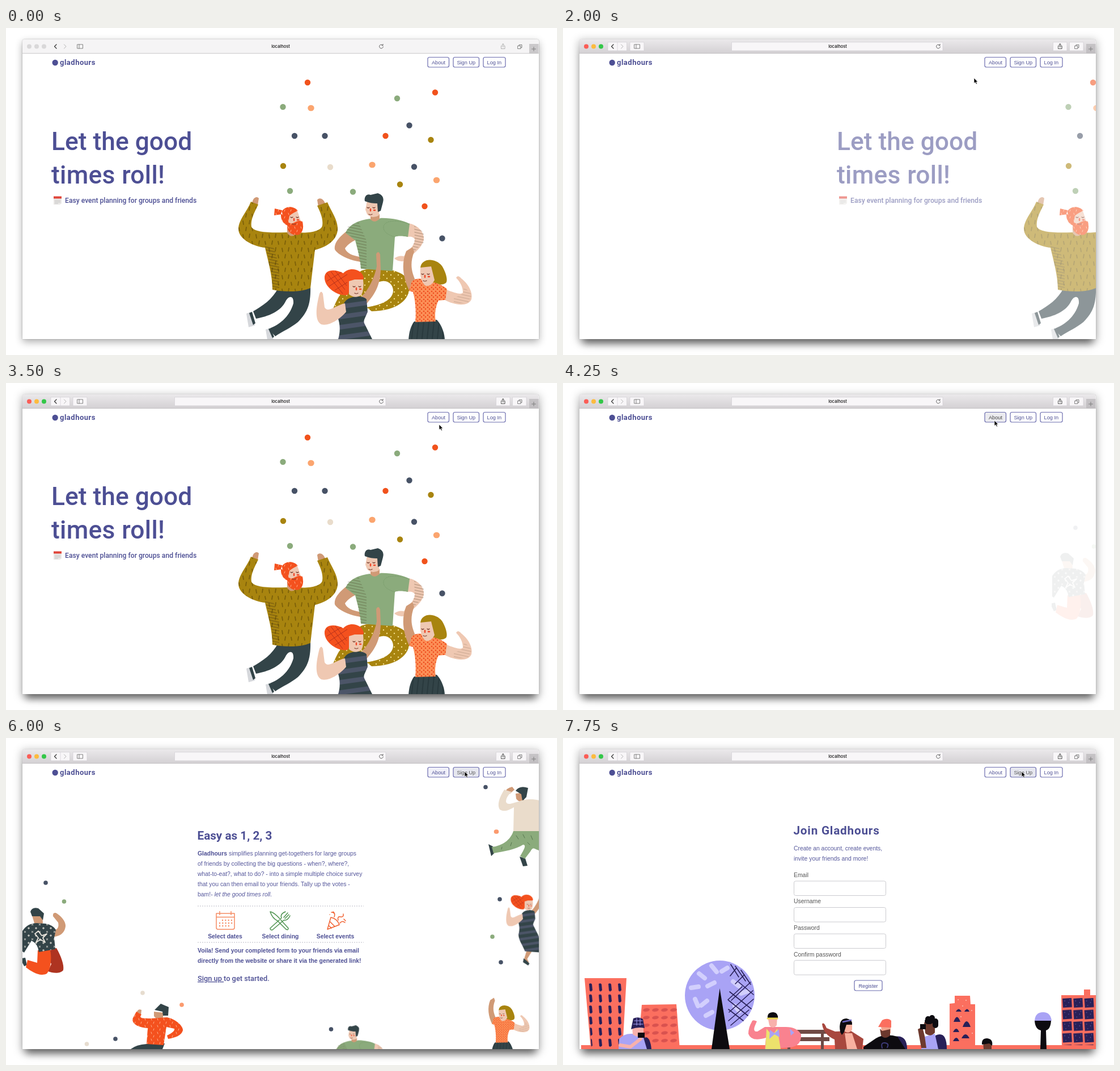
Animation of 972x576 px, one loop 8 s. Source, as an HTML page:

```html
<!DOCTYPE html>
<html lang="en">
<head>
<meta charset="utf-8">
<title>Event planner</title>
<style>
html, body { margin: 0; width: 100%; height: 100%; overflow: hidden; background: #fff; }
.win { position: absolute; left: 29px; top: 20px; width: 910.5px; height: 528px; border-radius: 4px 4px 0 0; }
.win.off { box-shadow: 0 5px 14px rgba(0,0,0,.32), 0 0 2px rgba(0,0,0,.35); }
.win.on { box-shadow: 0 14px 13px -6px rgba(0,0,0,.5), 0 3px 15px 2px rgba(0,0,0,.25), 0 0 1px rgba(0,0,0,.4); }
svg { position: absolute; left: 0; top: 0; width: 972px; height: 576px; }
text { font: 10.42px "Liberation Sans", Arial, sans-serif; fill: #55579b; }
.b { font-weight: 700; fill: #4d4f94; }
.r { font-family: Roboto, sans-serif; font-weight: 500; fill: #4d4f94; }
.big { font-size: 44.3px; }
.h { font-size: 20.7px; font-weight: 700; }
.m { text-anchor: middle; }
.lab { fill: #555; }
.nav { stroke: #6b6cae; stroke-width: 1.2; fill: #fff; color: #4d4f94; }
.nav text { font-size: 9.2px; stroke: none; fill: currentColor; text-anchor: middle; }
.line { fill: none; stroke-linecap: round; stroke-linejoin: round; }
.ol { fill: #a8840f; } .dk { fill: #334448; } .gr { fill: #8bab7c; } .or { fill: #f4511e; }
.tan { fill: #d09a76; } .pk { fill: #efc8b2; } .cr { fill: #eadccb; }
.co { fill: #fb6f5f; } .nv { fill: #282058; } .lv { fill: #a9a3f5; } .bk { fill: #0d0b10; }
.dots { fill: none; stroke-linecap: round; stroke-width: 10.4; }
.small { stroke-width: 7.6; }
.lamps { stroke-width: 8; }

/* One 8 s clock, held for 250 ms (3.125%) per pose. */
.on, .off, .load, .idle, .cursor, .home, .about, .join, #nav1, #nav2 { animation: 8s step-end infinite; }
.on { animation-name: on; } .off { animation-name: off; }
.load { animation-name: load; } .idle { animation-name: idle; }
.home { animation-name: home; } .about { animation-name: about; } .join { animation-name: join; }
.cursor { animation-name: cursor; } #nav1 { animation-name: nav1; } #nav2 { animation-name: nav2; }
@keyframes on { 0% { opacity: 0 } 18.75%, 100% { opacity: 1 } }
@keyframes off { 0% { opacity: 1 } 18.75%, 100% { opacity: 0 } }
@keyframes load { 0%, 21.875%, 100% { opacity: 0 } 18.75% { opacity: 1 } }
@keyframes idle { 0%, 21.875%, 100% { opacity: 1 } 18.75% { opacity: 0 } }
@keyframes home {
  0% { translate: 0; opacity: 1 }
  18.75% { translate: 0; opacity: 0 }
  21.875% { translate: 841px; opacity: .08 }
  25% { translate: 403px; opacity: .56 }
  28.125% { translate: 131px; opacity: .86 }
  31.25% { translate: 17px; opacity: .98 }
  34.375% { translate: 0; opacity: 1 }
  53.125%, 100% { translate: 0; opacity: 0 }
}
@keyframes about {
  0% { translate: 0; opacity: 0 }
  53.125% { translate: 834px; opacity: .08 }
  56.25% { translate: 395px; opacity: .57 }
  59.375% { translate: 126px; opacity: .86 }
  62.5% { translate: 15.5px; opacity: .98 }
  65.625% { translate: 0; opacity: 1 }
  87.5%, 100% { translate: 0; opacity: 0 }
}
@keyframes join {
  0% { translate: 0; opacity: 0 }
  87.5% { translate: 706px; opacity: .22 }
  90.625% { translate: 269px; opacity: .7 }
  93.75% { translate: 67px; opacity: .92 }
  96.875%, 100% { translate: 0; opacity: 1 }
}
@keyframes nav1 {
  0%, 87.5%, 100% { fill: #fff; color: #4d4f94 }
  46.875% { fill: #ebebef; color: #444 }
  65.625% { fill: #f0f0f9; color: #4d4f94 }
}
@keyframes nav2 { 0% { fill: #fff; color: #4d4f94 } 68.75%, 100% { fill: #e6e7ef; color: #555 } }
@keyframes cursor {
  0% { translate: 683px 50px; opacity: 0 }
  3.125% { translate: 683px 50px; opacity: 1 }
  6.25% { translate: 672px 43px }
  9.375% { translate: 664px 33px }
  12.5% { translate: 661px 30px }
  15.625% { translate: 660px 34px }
  18.75% { translate: 659px 36px }
  21.875% { translate: 668px 47px }
  25% { translate: 725px 88px }
  28.125% { translate: 790px 128px }
  31.25% { translate: 804px 136px }
  34.375% { translate: 802px 131px }
  37.5% { translate: 786px 106px }
  40.625% { translate: 770px 82px }
  43.75% { translate: 764px 73px }
  46.875% { translate: 761px 66px }
  65.625% { translate: 777px 66px }
  68.75% { translate: 797px 62px }
  71.875%, 100% { translate: 809px 59px; opacity: 1 }
}
</style>
</head>
<body>
<div class="win off"></div>
<div class="win on"></div>
<svg viewBox="0 0 972 576">
<defs>
  <clipPath id="page"><path d="M29 45H939.5V548H29Z"/></clipPath>
  <linearGradient id="bar" x2="0" y2="1"><stop stop-color="#ebe9eb"/><stop offset="1" stop-color="#d3d0d3"/></linearGradient>
  <pattern id="knit" width="23" height="24" patternUnits="userSpaceOnUse">
    <path class="ol" d="M0 0H23V24H0Z"/>
    <path class="line" stroke="#7c6008" stroke-width="1.8" d="M4 4l1 6M16 3l-1 6M10 15l-1 6M20 16l1 5"/>
  </pattern>
  <pattern id="spots" width="13" height="12" patternUnits="userSpaceOnUse">
    <path class="ol" d="M0 0H13V12H0Z"/>
    <path class="line" stroke="#f2dd8a" stroke-width="2.4" d="M3 3h0M9 9h0"/>
  </pattern>
  <pattern id="berry" width="7" height="7" patternUnits="userSpaceOnUse">
    <path fill="#fc8f57" d="M0 0H7V7H0Z"/>
    <path class="line" stroke="#ee4a1c" stroke-width="2.5" d="M2 2h0M5 5h0"/>
  </pattern>
  <pattern id="stripe" width="60" height="18" patternUnits="userSpaceOnUse" patternTransform="rotate(-8)">
    <path class="dk" d="M0 0H60V18H0Z"/><path fill="#4c5568" d="M0 6H60V14H0Z"/>
  </pattern>
  <pattern id="pleat" width="9" height="50" patternUnits="userSpaceOnUse" patternTransform="rotate(6)">
    <path class="dk" d="M0 0H9V50H0Z"/><path stroke="#1f2d31" d="M4 0V50"/>
  </pattern>
  <pattern id="flame" width="11" height="12" patternUnits="userSpaceOnUse">
    <path class="or" d="M0 0H11V12H0Z"/><path class="line" stroke="#ffb08a" d="M3 2l1 3M8 8l-1 3"/>
  </pattern>
  <pattern id="stars" x="36" y="332" width="13" height="13" patternUnits="userSpaceOnUse">
    <path class="dk" d="M0 0H13V13H0Z"/><path stroke="#e8e4dc" d="M2 3h4M4 1v4M9 8l3 3M12 8l-3 3"/>
  </pattern>
  <pattern id="hatch" width="20" height="5" patternUnits="userSpaceOnUse" patternTransform="rotate(12)"><path stroke="#3b2c10" stroke-opacity=".6" d="M0 2H20"/></pattern>
  <pattern id="tall" x="41" y="430" width="17" height="19.5" patternUnits="userSpaceOnUse">
    <path class="nv" d="M5 3Q9 1 10 4L11 14Q9 18 6 15Z"/>
  </pattern>
  <pattern id="wide" x="139" y="472" width="16" height="13.5" patternUnits="userSpaceOnUse">
    <ellipse cx="8" cy="7" rx="6" ry="3" fill="#d9524f" transform="rotate(-9 8 7)"/>
  </pattern>
  <pattern id="panes" x="880" y="457" width="19.3" height="20.5" patternUnits="userSpaceOnUse">
    <path class="nv" d="M1 2L17 1L18 17L2 18Z"/>
    <path class="line" stroke="#8d86e0" stroke-width="1.2" d="M5 6h0M12 9h0M7 14h0M14 4h0"/>
  </pattern>
  <g id="face" class="line">
    <path stroke="#7a4032" stroke-width="1.2" d="M0 0q2 2 4 0M10 0q2 2 4 0M3 12q3 2 6 0"/>
    <path stroke="#ee4a2c" stroke-width="2.5" d="M6 3v3M12 5h2"/>
  </g>

  <g id="tee">
    <path fill="url(#spots)" d="M626 428C650 418 700 424 710 445C718 470 700 498 645 499L636 492C660 488 683 480 683 462C682 446 664 440 650 452L600 498L575 500C585 470 605 445 626 428Z"/>
    <path class="tan" d="M601 358C590 366 578 378 580 390C585 400 610 411 628 412Q642 414 645 402Q634 398 626 403C612 402 600 396 598 388C604 380 612 375 620 372ZM643 328H659V345H643Z"/>
    <path class="pk" d="M711 344C725 347 738 358 737 372C735 388 715 400 705 410Q693 413 685 406Q692 400 702 402C712 392 722 380 721 372C718 367 713 367 706 368Z"/>
    <path class="gr" d="M599 361C605 345 625 338 642 336Q650 346 660 335C675 334 700 338 712 345L709 368C700 366 690 366 686 368L682 428L626 424C625 405 620 390 616 374Z"/>
    <path class="pk" d="M637 304H660L658 330Q646 337 637 328L634 320Z"/>
    <path class="dk" d="M633 305C631 296 638 291 643 294L656 291Q668 295 665 307L661 322L656 324L655 309Q643 309 636 306Z"/>
    <use href="#face" x="637" y="316"/>
    <path fill="url(#hatch)" d="M603 350L622 342L636 375V424H626L617 372L599 361ZM720 348L737 360V378L715 398L721 372Z" opacity=".7"/>
    <path class="line" stroke="#779a6a" stroke-dasharray="1 2" d="M711 345C690 338 668 338 666 350Q665 362 686 368"/>
  </g>

  <g id="stripes">
    <path class="tan" d="M653 398Q657 391 660 399L661 425C660 455 650 470 634 488L627 474C640 460 650 440 654 420ZM612 596L603 625L612 640L618 634L613 624L630 596Z"/>
    <path class="dk" d="M602 622l8 6 10 10-4 6-16-10Z"/>
    <path fill="url(#stripe)" d="M598 482C605 472 630 470 636 478L638 500C634 510 630 515 632 520L646 548C656 570 662 590 658 604L606 600C598 580 586 565 586 548C592 530 587 512 583 505Z"/>
    <path class="pk" d="M553 468Q556 461 559 468L562 492C568 503 582 488 598 485L600 500C590 512 570 526 556 522C545 516 546 495 553 468Z"/>
    <path class="or" d="M562 441C561 425 580 424 595 432C605 420 628 424 631 440L628 448L612 450L603 470C590 474 563 460 562 441Z"/>
    <path fill="none" stroke="#b8321b" d="M566 432l28 36M573 429l25 32M581 428l20 26M566 446l26-16M570 455l32-21M580 462l22-14"/>
    <path class="pk" d="M605 446L615 443H630Q632 460 627 470Q616 478 605 469Z"/>
    <use href="#face" x="612" y="455"/>
  </g>

  <g id="blouse">
    <path class="tan" d="M706 393C697 415 700 440 712 464L724 448C715 430 712 415 720 394L717 386Z"/>
    <path class="pk" d="M774 460C795 468 803 470 806 466C806 455 800 446 794 440Q797 434 803 441C815 450 824 465 821 478C815 492 790 488 774 479Z"/>
    <path fill="url(#hatch)" d="M808 456L822 470L815 484L790 486V476L806 468Z" opacity=".4"/>
    <path fill="url(#pleat)" d="M720 517L760 514C770 525 774 540 774 550H710C711 535 714 525 720 517Z"/>
    <path class="ol" d="M731 422C733 405 757 404 769 419C776 430 780 445 776 449C770 454 756 452 750 447Z"/>
    <path fill="url(#berry)" d="M716 446C725 440 735 440 738 447Q746 456 754 448C765 450 777 458 778 460L775 479L763 480C757 492 756 505 758 517L722 518C724 500 722 480 718 465L711 463Z"/>
    <path class="pk" d="M731 422L750 420L756 444Q750 456 740 454Q729 445 731 422Z"/>
    <use href="#face" x="733" y="433"/>
  </g>
</defs>

<path d="M29 45H939.5V548H29Z" fill="#fff"/>
<path id="top" d="M29 45V24Q29 20 33 20H935.500Q939.500 20 939.500 24V45Z" fill="#f5f4f5"/>
<path class="dots lamps" stroke="#d9d8d9" d="M41 32.500h0M54 32.500h0M67 32.500h0"/>
<g class="on">
  <path d="M29 45V24Q29 20 33 20H935.500Q939.500 20 939.500 24V45Z" fill="url(#bar)"/>
  <g class="dots lamps"><path stroke="#fb5d57" d="M41 32.500h0"/><path stroke="#fdbb3e" d="M54 32.500h0"/><path stroke="#33c748" d="M67 32.500h0"/></g>
  <path fill="#f8f6f8" stroke="#cfccd0" stroke-width=".6" stroke-linejoin="round" d="M79 25h33.500v15h-33.500ZM118 25h25v15h-25ZM297.500 25h372.500v15h-372.500ZM864.500 25h24.500v15h-24.500ZM893.500 25h24.500v15h-24.500ZM96 25v15"/>
</g>
<path d="M923 28H939.500V45H923Z" fill="#bab7ba" opacity=".7"/>
<path d="M29 44.700H939.500" stroke="#bdbabd" stroke-width=".8"/>
<g class="line" stroke="#777" stroke-width=".9">
  <path d="M89 29l-3.500 3.500 3.500 3.500" stroke="#333" stroke-width="1.2"/>
  <path d="M102.500 29l3.500 3.500-3.500 3.500" stroke="#aaa"/>
  <path d="M126 29h9.500v7h-9.500ZM129 29v7M927.500 37h7M931 33.500v7M903 31.500h5v5h-5ZM905 31.500v-2h5v5h-2"/>
  <path id="share" stroke="#aaa" d="M875 31.500h-1.500v5h6.500v-5h-1.500M876.800 34v-6M875 29.500l1.800-1.800 1.800 1.800"/>
  <g class="idle" stroke="#555">
    <path class="on" d="M875 31.500h-1.500v5h6.500v-5h-1.500M876.800 34v-6M875 29.500l1.800-1.800 1.800 1.800"/>
    <path d="M664.500 30.200A3.400 3.400 0 1 0 665.400 33M663 30.800h2v-2.300"/>
  </g>
</g>
<g class="load">
  <path class="line" stroke="#333" d="M659 29.500l6 6M665 29.500l-6 6"/><path fill="#2f94e8" d="M298 38.300H326.500V40H298Z"/>
</g>
<text x="484.500" y="35.400" class="m" style="font:500 7.5px Inter,sans-serif;fill:#111">localhost</text>

<g clip-path="url(#page)">
  <g class="home">
    <g class="dots">
      <path stroke="#f1521c" d="M532 96h0M757 113.500h0M669.500 190h0M738.500 314h0"/>
      <path stroke="#8bab7c" d="M488.500 139h0M690 124h0M501 287h0M612 288.500h0"/>
      <path stroke="#fba56f" d="M537.500 141h1M645.500 241h1M759 268h1"/>
      <path stroke="#475266" d="M509 190h0M562.500 190h0M711.500 171.500h0M720 244.500h0M769.500 370.500h0"/>
      <path stroke="#a8840f" d="M489 243h0M749.500 197h0M695 275.500h0"/>
      <path stroke="#e9dccb" d="M572 245h0"/>
    </g>
    <text class="r big" x="80" y="215">Let the good</text>
    <text class="r big" x="80" y="274" letter-spacing=".3">times roll!</text>
    <text class="r" x="104" y="308" style="font-size:12.18px">Easy event planning for groups and friends</text>
    <path d="M84 297h14v12l-3 2H84Z" fill="#e9e7e5"/><path d="M84 296.500h14v4H84Z" fill="#e0453a"/>
    <path d="M86 304h10M86 306.500h10M86 309h6" stroke="#bbb" stroke-width=".8"/>

    <path class="tan" d="M434 309C436 298 442 296 446 300L444 312ZM549 303C552 298 560 300 563 309L551 315Z"/>
    <path class="dk" d="M480 458L537 452C538 485 533 500 515 518C503 528 488 534 475 543L463 530C480 524 500 510 507 485C508 472 500 470 494 480C485 500 462 508 441 512L436 499C452 490 470 478 480 458Z"/>
    <path fill="#d6d8dc" d="M424 503L433 500L439 524L428 527ZM458 531L466 529L472 549L461 549Z"/>
    <path class="dk" d="M429 502L434 500L440 520L436 523ZM463 530L467 529L473 544L470 546Z"/>
    <path fill="url(#knit)" d="M432 306L445 311C438 325 431 338 433 350C437 360 465 361 494 360H514C535 362 556 358 558 348C560 335 553 322 549 313L567 307C573 322 586 338 585 356C583 375 565 386 545 391L537 458C520 466 490 465 470 461C470 435 462 410 457 387C437 385 410 372 410 354C410 338 426 322 432 306Z"/>
    <path fill="url(#hatch)" d="M457 382L472 386L482 420V460H470Q470 420 457 387Z"/>
    <path class="tan" d="M496 350H511V363Q503 371 496 361Z"/>
    <path class="pk" d="M497 326Q512 318 515 325L521 343Q505 347 496 342Z"/>
    <path fill="url(#flame)" d="M485 330C485 315 505 310 515 322Q505 326 500 331L497 348C489 345 485 338 485 330ZM487 321L474 318L473 330L487 328ZM495 338Q500 347 508 343Q518 337 523 341Q527 358 517 364Q503 367 497 355Z"/>
    <use href="#face" x="502" y="333"/>
    <use href="#tee"/><use href="#stripes"/><use href="#blouse"/>
  </g>

  <g class="about">
    <g class="dots small">
      <path stroke="#475266" d="M846 86.500h0M871 284h0M873 395h0M573.500 513h0M193 530h0M70 255h0"/>
      <path stroke="#8bab7c" d="M102.500 288h0M858 350h0"/><path stroke="#fb9a6e" d="M864.500 165h1M310 470h0"/>
      <path stroke="#e6dccf" d="M241 449h0M142.500 539h0"/>
    </g>
    <use href="#tee" transform="translate(223.6 331.6) scale(.6)"/>
    <use href="#stripes" transform="translate(570 33.6) scale(.57)"/>
    <use href="#blouse" transform="translate(430.6 226) scale(.6)"/>

    <path class="tan" d="M80 338C90 340 94 334 92 325L83 314Q82 307 88 308C98 314 106 324 105 332C103 345 94 349 85 350ZM46 313L64 312L65 326Q58 333 50 326Z"/>
    <path class="dk" d="M28 388l6-1 3 13-5 2-4-8ZM43 306Q46 297 57 300L67 309L65 321L60 314H46Z"/>
    <path fill="#ae3421" d="M66 374L89 370C97 384 103 400 101 409C95 416 82 414 74 411L80 398Z"/>
    <path class="or" d="M56 374H78C81 388 79 408 72 415C60 421 46 412 35 404L38 391L55 396Z"/>
    <path fill="url(#stars)" d="M29 340Q38 326 54 326L70 327Q84 330 88 338L85 352L87 372L58 377Q56 362 45 357L32 378L29 376Z"/>
    <path class="line" stroke="#e8e4dc" stroke-width="1.8" d="M57 340l6 8 9-3-7 7 4 8-8-5-8 5 4-8-6-7Z"/>

    <path class="tan" d="M880 97Q882 88 893 86L897 91L889 98ZM899 98L914 96V110Q906 115 900 107Z"/>
    <path class="dk" d="M899 93Q906 83 921 88L918 104L911 111L909 99ZM851 187l8 4 3 11-6 6ZM906 209l10 3 4 13-8 1Z"/>
    <path class="cr" d="M879 91C870 105 866 118 871 126C880 132 890 125 896 122L895 165H941V110C925 106 912 109 904 112C895 114 884 120 882 112C882 105 888 98 892 95Z"/>
    <path class="gr" d="M895 164H941V198C932 196 930 190 925 200L915 213L907 208C915 195 918 188 912 188C900 196 878 200 860 203L857 192C875 190 890 180 895 164Z"/>
    <path class="line" stroke="#577650" d="M900 172l4 6M912 170l3 6M892 184l-2 6M926 172l3 7M875 192l-1 4M920 184l4 4"/>

    <path class="dk" d="M220 548Q230 540 248 539L280 538L276 548Z"/>
    <path class="tan" d="M230 484Q233 476 239 479L238 488ZM261 482L279 484L276 495Q266 497 261 490Z"/>
    <path fill="url(#flame)" d="M230 482L239 487C234 494 240 494 255 494L284 492C300 495 313 508 312 515C310 524 298 528 286 530L284 524C292 520 298 516 297 512L283 509L278 541L248 539L250 511C235 510 223 505 223 495Z"/>
    <path class="dk" d="M262 479L273 468L287 474L286 489L277 489L276 482Z"/>

    <text class="r h" x="337.500" y="179">Easy as 1, 2, 3</text>
    <text x="338" y="206.700"><tspan class="b">Gladhours</tspan> simplifies planning get-togethers for large groups</text>
    <text x="338" y="225">of friends by collecting the big questions - when?, where?,</text>
    <text x="338" y="243.200">what-to-eat?, what to do? - into a simple multiple choice survey</text>
    <text x="338" y="261.300">that you can then email to your friends. Tally up the votes -</text>
    <text x="338" y="279.300">bam!- <tspan font-style="italic">let the good times roll.</tspan></text>
    <path d="M338 296H631M338 360H631" stroke="#b9b9c4" stroke-dasharray="2 2"/>
    <g class="line" stroke-width="1.5">
      <path stroke="#f58a62" d="M371 309h32v25q0 3-3 3h-26q-3 0-3-3ZM371 315.500h32M377 305.500v6M397 305.500v6"/>
      <path stroke="#f58a62" stroke-width="2.4" stroke-dasharray="0 5.3" d="M382 321h17M377 326h22M377 331h17"/>
      <path stroke="#4f9350" d="M466 306C473 307 483 318 488 324L498 335Q498 339 494 337L479 322Q470 318 466 306ZM466 335L486 317Q483 310 493 306M470 338L490 321Q497 322 501 313M490 316l7-8M492 318l7-7M466 335q0 4 4 3"/>
      <path stroke="#f1602f" d="M573 316L567 337L588 329Q584 318 573 316ZM571 323l9 9M569 330l5 5M574 307q8 0 5 8M571 311h0M586 321q-2-7 4-6t5-5M589 326q4-5 9-1M577 306l2 2M596 319l3 3"/>
    </g>
    <text class="b m" x="386.500" y="353">Select dates</text>
    <text class="b m" x="484" y="353">Select dining</text>
    <text class="b m" x="581" y="353">Select events</text>
    <text class="b" x="338" y="378">Voila! Send your completed form to your friends via email</text>
    <text class="b" x="338" y="396">directly from the website or share it via the generated link!</text>
    <text class="r" x="338" y="428" style="font-size:12.8px"><tspan text-decoration="underline">Sign up </tspan>to get started.</text>
  </g>

  <g class="join">
    <path class="co" d="M38 423H112L105 548H49ZM139 470L200 469L206 548H132ZM682 468L691 467V454H718L719 469H727V548H682ZM879 453H919V443H930V453H943V548H880ZM32 541H943V548H32Z"/>
    <path fill="url(#tall)" d="M41 430H110L104 544H50Z"/><path fill="url(#wide)" d="M139 472H203V541H139Z"/>
    <path fill="url(#panes)" d="M880 457H939V541H880Z"/>
    <path class="nv" d="M693 482q5-9 10 0ZM708 482q5-9 9 0ZM689 500q6-17 12 0ZM705 509q7-20 14 0ZM688 518q6-12 11 0ZM703 529q7-14 14 0ZM688 534q6-12 11 0Z"/>
    <path class="line" stroke="#fdc0b6" stroke-width="2" d="M697 461h0M711 462h0M705 472h0M721 480h0M702 491h0M722 520h0"/>

    <circle class="lv" cx="276.500" cy="453.500" r="61.500"/>
    <path class="line" stroke="#d2cffd" stroke-width="8" d="M240 415l10 8M262 401l9 11M290 405l-10 6M226 440l13-2M255 437l12-6M233 460l5 12M254 463l-10 8M252 489l11-6M300 429l10 8M314 450l12-4M303 472l8 9"/>
    <path class="line" stroke="#282058" stroke-width="1.6" d="M296 399l14 22M304 402l18 26M314 409l17 25M310 430l26 22M316 438l-25 23M331 430l-34 32M335 445l-42 38M336 460l-44 38M328 479l-32 27M294 447l38 30M292 462l34 27M292 478l26 20M306 405l-11 14M320 417l-16 16"/>
    <path class="bk" d="M276.500 441L294 548H262Z"/>

    <path class="nv" d="M140 530Q153 520 156 548H138Z"/>
    <path class="lv" d="M98 548L99 530Q108 520 122 521H140L148 548Z"/>
    <path fill="#f8b1ac" d="M122 508H142V522Q133 530 123 522Z"/><path class="nv" d="M120 513L124 494Q133 490 141 495L144 511Q132 508 120 513Z"/>
    <path class="line" stroke="#a9a3f5" d="M126 498h14M124 504h17M130 494v12M136 494v12"/>
    <path class="line" stroke="#f8b1ac" stroke-width="6" d="M101 541l18 3 18-14"/><path class="bk" d="M132 519h12v9h-12Z"/>

    <path fill="#6f4a45" d="M387 514H467V521H387ZM383 527H470V534H383ZM396 514h5v34h-5ZM455 514h5v34h-5Z"/>
    <path fill="#f9828f" d="M333 500Q334 495 342 499L339 506Q334 518 343 517L356 509H390Q412 508 420 522Q421 543 400 545L356 548L358 528Q332 536 327 521Q327 510 333 500Z"/>
    <path fill="#ece26c" d="M359 512l10 12 9-12 6 36h-27Z"/>
    <path class="lv" d="M365 514l8 6 8-7 1 14-9-5-9 8ZM400 512l8 7-6 5Z"/>
    <path fill="#f8b1ac" d="M361 491H378L377 506Q370 514 364 506Z"/><path class="bk" d="M361 493Q360 483 371 483Q380 484 379 494Z"/>
    <path class="line" stroke="#e9d651" stroke-width="3" d="M361 494h17"/>

    <path fill="#a8473e" d="M457 504Q460 499 465 511L480 517L508 516L530 530L528 548H480L479 531Q460 523 457 504Z"/>
    <path fill="#f9b1a0" d="M497 520h13l9 28h-18ZM495 500h15v14q-7 9-15 1Z"/>
    <path class="bk" d="M489 518Q485 494 500 494Q511 496 510 505H500L496 518L492 523Z"/><path class="line" stroke="#6d67c4" stroke-width="2.5" d="M494 500l14-3"/>

    <path class="nv" d="M585 526Q607 522 607 548H585Z"/>
    <path class="bk" d="M530 544L552 529Q568 520 590 526L604 548H530Z"/><path class="line" stroke="#3d3a78" stroke-width="2" d="M563 546q-3-10 5-9t4 8"/>
    <path fill="#f2a48d" d="M561 506h17v14h-16Z"/><path fill="#6b382d" d="M559 512l4 4 14-3v11q-9 8-16 0Z"/>
    <path class="co" d="M556 509L563 497Q573 492 579 498V510Z"/>

    <path class="nv" d="M657 524Q677 515 677 548H655Z"/>
    <path class="lv" d="M632 548L638 526L656 521L662 548Z"/>
    <path fill="#6d3a2e" d="M637 501h19v18q-8 9-17 1ZM626 513l8-4 4 16 3 21h-9ZM741 536h15v12h-14Z"/>
    <path class="line" stroke="#0d0b10" stroke-width="10" d="M644 495h0M651 493h0M657 499v7M643 499h5"/>
    <path class="bk" d="M630 504h10v9h-10ZM739 540Q738 529 748 529Q759 530 757 542L752 538Z"/>

    <path class="lv" d="M832 498Q833 483 847 483Q860 483 862 498Z"/>
    <path class="bk" d="M832 498H861Q860 513 852 515L853 548H842L843 515Q833 513 832 498Z"/>

    <text class="r h" x="406.500" y="170" letter-spacing=".8">Join Gladhours</text>
    <text x="407" y="198">Create an account, create events,</text>
    <text x="407" y="216">invite your friends and more!</text>
    <text class="lab" x="407" y="244.700">Email</text><text class="lab" x="407" y="291.400">Username</text>
    <text class="lab" x="407" y="338">Password</text><text class="lab" x="407" y="384.600">Confirm password</text>
    <g fill="#fff" stroke="#cbcbcf">
      <rect id="field" x="407.500" y="252" width="162" height="25.500" rx="3"/>
      <use href="#field" y="46.500"/><use href="#field" y="93"/><use href="#field" y="139.700"/>
    </g>
    <g class="nav"><rect x="514" y="427" width="49" height="18" rx="3"/><text x="538.500" y="439.700">Register</text></g>
  </g>

  <g class="idle">
    <circle cx="86.700" cy="61" r="5.2" fill="#4d4f94"/>
    <text class="r" x="95" y="65" style="font-size:13px;font-weight:700" letter-spacing=".5">gladhours</text>
    <g class="nav" id="nav1"><rect x="744" y="51.500" width="37.500" height="17.500" rx="3"/><text x="763" y="63.700">About</text></g>
    <g class="nav" id="nav2"><rect x="789" y="51.500" width="45.500" height="17.500" rx="3"/><text x="811.800" y="63.700">Sign Up</text></g>
    <g class="nav"><rect x="842" y="51.500" width="39" height="17.500" rx="3"/><text x="861.300" y="63.700">Log In</text></g>
  </g>
</g>
<path class="cursor" d="M0 0V9.500L2.200 7.500L3.900 11L5.500 10.200L3.900 6.900H6.800Z" stroke="#fff" stroke-width=".7"/>
</svg>
</body>
</html>
```
